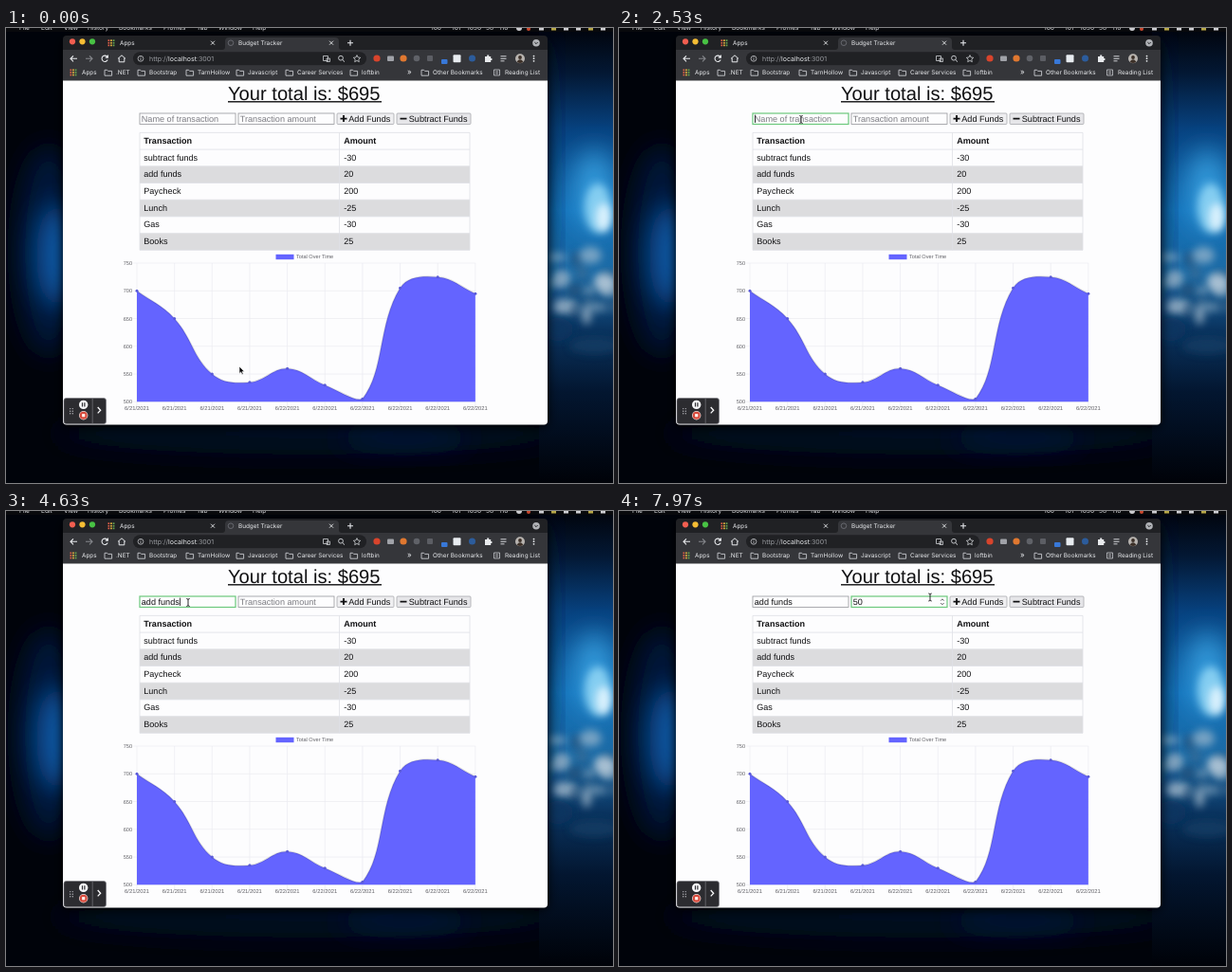
Recreate the animation shown at these times as an HTML page. Size 640x480 px, loop 8 s.

```html
<!DOCTYPE html>
<html lang="en">
<head>
<meta charset="utf-8">
<title>Budget Tracker</title>
<style>
html, body { margin: 0; width: 100%; height: 100%; overflow: hidden; background: #000; }
svg { display: block; width: 100%; height: 100%; }
text { font-family: "Liberation Sans", Arial, sans-serif; white-space: pre; text-rendering: geometricPrecision; }
.ui { font-family: Inter, Roboto, sans-serif; }
</style>
</head>
<body>
<svg id="stage" viewBox="0 0 640 480">
  <defs>
    <filter id="soft" x="-100%" y="-100%" width="300%" height="300%"><feGaussianBlur stdDeviation="14"/></filter>
    <filter id="mist" x="-100%" y="-100%" width="300%" height="300%"><feGaussianBlur stdDeviation="4"/></filter>
    <filter id="shade" x="-20%" y="-20%" width="140%" height="140%"><feGaussianBlur stdDeviation="6"/></filter>
    <linearGradient id="air" x2="0" y2="1">
      <stop offset="0" stop-color="#01040c"/>
      <stop offset=".1" stop-color="#031834"/>
      <stop offset=".22" stop-color="#07417e"/>
      <stop offset=".4" stop-color="#1270b8"/>
      <stop offset=".54" stop-color="#1c6aa4"/>
      <stop offset=".66" stop-color="#0a3460"/>
      <stop offset=".8" stop-color="#031630"/>
      <stop offset="1" stop-color="#000208"/>
    </linearGradient>
  </defs>
  <rect width="640" height="480" fill="#00030a"/>
  <g id="sky"></g>
  <g id="menu"></g>
  <g id="browser"></g>
  <g id="page"></g>
  <g id="chart"></g>
  <g id="widget"></g>
  <g id="live"></g>
</svg>
<script>
const NS = "http://www.w3.org/2000/svg";
const LOOP = 8000;
const INK = "#101012", PAPER = "#fdfdfe", LIGHT = "#e8eaed", GRAY = "#9a9ca1", BAR = "#202124", TOOLS = "#35363a";
const PLOT = "#6464ff", RULE = "#dfe0e6";
const byId = id => document.getElementById(id);
let layer;

function add(tag, attrs, content) {
  const el = document.createElementNS(NS, tag);
  for (const key in attrs) el.setAttribute(key, attrs[key]);
  if (content !== undefined) el.textContent = content;
  layer.appendChild(el);
  return el;
}
const rect = (x, y, width, height, fill, more) => add("rect", { x, y, width, height, fill, ...more });
const dot = (cx, cy, r, fill, more) => add("circle", { cx, cy, r, fill, ...more });
const shape = (d, fill) => add("path", { d, fill });
const line = (d, stroke, width = 1, more) =>
  add("path", { d, stroke, "stroke-width": width, fill: "none", ...more });
const label = (x, y, size, str, fill = INK, more) =>
  add("text", { x, y, "font-size": size, fill, ...more }, str);
const ui = (x, y, str, fill = LIGHT, size = 6.4) => label(x, y, size, str, fill, { class: "ui" });
const glow = (cx, cy, rx, ry, fill, filter = "soft", opacity = 1) =>
  add("ellipse", { cx, cy, rx, ry, fill, opacity, filter: `url(#${filter})` });

function drawSky() {
  layer = byId("sky");
  glow(45, 235, 34, 110, "#03183a");
  glow(54, 240, 22, 54, "#0a58a4");
  glow(320, 428, 270, 22, "#020b20");
  glow(420, 432, 70, 10, "#04183c");
  rect(562, 0, 78, 480, "url(#air)");
  glow(566, 150, 8, 150, "#041a3a", "soft", .8);
  glow(620, 170, 20, 42, "#3aa4e4", "soft", .9);
  glow(624, 190, 14, 26, "#9adcf8", "mist", .8);
  glow(630, 200, 8, 15, "#e4f6ff", "mist", .9);
  let seed = 11;
  const rand = () => (seed = seed * 16807 % 2147483647) / 2147483647;
  const tones = ["#8aa8c0", "#c2d2de", "#3f6c92", "#a8bfd0", "#294f74"];
  for (let i = 0; i < 22; i++) {
    glow(578 + rand() * 62, 238 + rand() * 70, 4 + rand() * 8, 3 + rand() * 7, tones[i % 5], "mist", .65);
  }
  glow(582, 318, 16, 12, "#0b3560", "mist", .8);
  glow(620, 335, 26, 9, "#123f68", "mist", .7);
}

function drawMenu() {
  layer = byId("menu");
  rect(0, 0, 640, 4, "#08090c");
  const items = [[14, "File"], [37, "Edit"], [61, "View"], [86, "History"], [119, "Bookmarks"],
    [166, "Profiles"], [201, "Tab"], [224, "Window"], [260, "Help"], [448, "100"], [470, "101"],
    [486, "1030"], [506, "58"], [520, "110"]];
  for (const [x, str] of items) ui(x, 1.6, str, "#dcdde0", 6.6);
  dot(541, 0, 3, "#d0d0d4");
  dot(551, 1, 2, "#d04a30");
  for (let i = 0; i < 6; i++) rect(562 + i * 13, 0, 5, 2.5, i % 3 == 1 ? "#b8a848" : "#d0d0d4");
}

function folder(x) {
  line(`M${x} 44.3h2.6l1 1.1h4v4.8h-7.6z`, "#c8cace", .9);
}

function apps(x, y) {
  const colors = ["#e06048", "#e4b040", "#68a850"];
  for (let i = 0; i < 9; i++) rect(x + i % 3 * 2.6, y + (i / 3 | 0) * 2.6, 1.7, 1.7, colors[i % 3]);
}

function drawBrowser() {
  layer = byId("browser");
  rect(60, 12, 511, 408, "#000", { rx: 5, filter: "url(#shade)" });
  rect(60, 8, 511, 410.5, BAR, { rx: 4 });
  rect(60, 23, 511, 33, TOOLS);
  shape("M228 23q3 0 3-3v-6q0-4 4-4h112q4 0 4 4v6q0 3 3 3z", TOOLS);
  ["#f25e50", "#f5bd34", "#48c244"].forEach((c, i) => dot(70 + i * 10.5, 14.3, 3.1, c));
  apps(107.5, 12.3);
  ui(120, 18.2, "Apps");
  dot(237, 15.7, 2.8, "none", { stroke: "#6c6e74", "stroke-width": .9 });
  ui(245, 18.2, "Budget Tracker");
  for (const x of [218, 343]) line(`M${x - 2} 13.7l4 4m0-4l-4 4`, LIGHT, .9);
  line("M360 15.7h6m-3-3v6", LIGHT, 1.1);
  dot(559, 15.7, 3.8, "#b0b2b6");
  line("M557.3 15l1.7 1.7 1.7-1.7", BAR, 1);

  line("M75 32.3h-7m3-3l-3 3 3 3", LIGHT, 1.1);
  line("M84 32.3h7m-3-3l3 3-3 3", "#85878c", 1.1);
  line("M107 30.6a3.2 3.2 0 1 0 .2 3M107.4 28.5v2.6h-2.6", LIGHT, 1.1);
  line("M118 32.4l4-3.6 4 3.6m-6.8-.8v4.2h5.6v-4.2", LIGHT, 1);
  rect(134, 25.3, 246, 14, BAR, { rx: 7 });
  dot(142, 32.3, 2.9, "none", { stroke: "#c4c6ca", "stroke-width": .8 });
  line("M142 31.7v2.2m0-3.6v.8", "#c4c6ca", .8);
  layer = ui(151, 34.7, "", GRAY, 7);
  add("tspan", {}, "http://");
  add("tspan", { fill: LIGHT }, "localhost");
  add("tspan", {}, ":3001");
  layer = byId("browser");
  line("M334.5 29.5h5v5h-5zM338 32h3.5v3.5h-3.5z", "#d0d2d6", .8);
  dot(353, 31.7, 2.4, "none", { stroke: "#d0d2d6", "stroke-width": .9 });
  line("M354.8 33.5l2.2 2.2", "#d0d2d6", 1);
  line("M370 28.6l1.1 2.4 2.6.3-1.9 1.8.5 2.6-2.3-1.3-2.3 1.3.5-2.6-1.9-1.8 2.6-.3z", "#d0d2d6", .8);

  dot(391, 32, 3.6, "#d8442c");
  rect(402, 29.5, 7, 5.5, "#a0a2a8", { rx: 1 });
  dot(419, 32, 3.6, "#e07830");
  dot(433, 32, 3.3, "#606268");
  rect(444, 29, 6, 6, "#5c5e64", { rx: 1 });
  rect(459, 33, 6.5, 5, "#3878d8", { rx: 1 });
  rect(471.5, 28.3, 8, 8, "#e8ecf0", { rx: 1 });
  dot(491.5, 32, 3.5, "#2c5c9c");
  shape("M505 30h2.2v-1.4h2V30h2v2h1.2v2h-1.2v2H505z", LIGHT);
  line("M521.5 29.8h6m-6 2.5h6m-6 2.5h4", "#d0d2d6", 1);
  dot(542, 32.2, 5, "#b8b4b0");
  dot(542, 31, 1.9, "#3c3028");
  shape("M538.6 35.6q3.4-4.5 6.8 0q-3.4 3-6.8 0z", "#3c3028");
  for (let i = 0; i < 3; i++) dot(556.5, 29.6 + i * 2.6, .9, LIGHT);

  apps(67.5, 43.5);
  const marks = [[104, ".NET"], [139, "Bootstrap"], [190, "TarnHollow"], [243, "Javascript"],
    [295, "Career Services"], [363, "loftbin"], [438, "Other Bookmarks"]];
  ui(80, 49.3, "Apps");
  for (const [x, str] of marks) { folder(x); ui(x + 12, 49.3, str); }
  ui(423, 49.2, "»", LIGHT, 8);
  line("M514.5 44h6v6h-6zM516 46h3m-3 2h3", "#c8cace", .8);
  ui(526, 49.3, "Reading List");
}

function drawPage() {
  layer = byId("page");
  shape("M60 55.5h511v359q0 4-4 4h-503q-4 0-4-4z", PAPER);
  label(234, 75.6, 20.15, "Your total is: $695");
  rect(234, 77.1, 162, 1.4, INK);
  const edge = { stroke: "#a8a9ae", "stroke-width": .8, rx: 1 };
  rect(349, 90, 60, 11.5, "#efeff1", edge);
  rect(412, 90, 78, 11.5, "#e6e6e9", edge);
  line("M352.5 95.6h7m-3.5-3.5v7M415.5 95.6h7", INK, 1.9);
  label(361.3, 98.7, 9.1, "Add Funds");
  label(424.8, 98.7, 9.1, "Subtract Funds");

  const rows = [["Transaction", "Amount"], ["subtract funds", -30], ["add funds", 20], ["Paycheck", 200],
    ["Lunch", -25], ["Gas", -30], ["Books", 25]];
  const top = 110.4, step = 17.7;
  rows.forEach((row, i) => {
    const y = top + i * step;
    if (i && i % 2 == 0) rect(141, y, 348, step, "#dcdcde");
    const bold = { "font-weight": i ? 400 : 700 };
    label(145.3, y + 11.5, 9.05, row[0], INK, bold);
    label(356.2, y + 11.5, 9.05, row[1], INK, bold);
  });
  for (let i = 0; i <= 7; i++) line(`M141 ${top + i * step}h348`, RULE, .8);
  line("M141 110.4v123.9M351.5 110.4v123.9M489 110.4v123.9", RULE, .8);
}

function drawChart() {
  layer = byId("chart");
  const left = 138, top = 248, bottom = 394.3, gap = 39.65;
  const toY = v => bottom - (v - 500) / 250 * (bottom - top);
  const pts = [700, 650, 550, 535, 560, 530, 505, 705, 725, 695].map((v, i) => [left + i * gap, toY(v)]);
  const right = pts[9][0];
  const grid = "#ebebf1", small = "#606066";

  rect(284.5, 238.8, 19, 5.4, PLOT);
  label(306, 243.3, 5.6, "Total Over Time", small);
  for (let v = 500; v <= 750; v += 50) {
    line(`M133.5 ${toY(v)}H${right}`, grid, .7);
    label(133, toY(v) + 2, 5.6, v, small, { "text-anchor": "end" });
  }
  pts.forEach(([x], i) => {
    line(`M${x} ${top}V398.5`, grid, .7);
    label(x, 403.2, 5.8, i < 4 ? "6/21/2021" : "6/22/2021", small, { "text-anchor": "middle" });
  });

  // Tension spline with handles kept inside the plot.
  const clampY = y => Math.max(top, Math.min(bottom, y));
  const dist = (a, b) => Math.hypot(a[0] - b[0], a[1] - b[1]);
  const handles = pts.map((p, i) => {
    const a = pts[i - 1] || p, b = pts[i + 1] || p;
    const da = dist(a, p), db = dist(p, b), k = .4 / (da + db);
    const at = s => [p[0] + s * (b[0] - a[0]), clampY(p[1] + s * (b[1] - a[1]))];
    return [at(-k * da), at(k * db)];
  });
  let d = `M${pts[0]}`;
  for (let i = 1; i < 10; i++) d += `C${handles[i - 1][1]} ${handles[i][0]} ${pts[i]}`;
  shape(`${d}V${bottom}H${left}z`, PLOT);
  line(d, "#000", 1.7, { opacity: .12 });
  for (const [x, y] of pts) dot(x, y, 1.5, "#5a5ad8");
}

function drawWidget() {
  layer = byId("widget");
  rect(61, 390.5, 44.5, 27, "#2c2c30", { stroke: "#78787e", "stroke-width": .7, rx: 2.5 });
  for (let i = 0; i < 6; i++) dot(67.7 + i % 2 * 2.6, 401.6 + (i / 2 | 0) * 2.6, .7, "#b4b4ba");
  dot(81.7, 397.4, 4.7, "#f8f8fa");
  line("M80.5 395.3v4.2m2.4-4.2v4.2", "#2c2c30", 1.2);
  dot(81.7, 408.7, 4.7, "#e8dcda");
  dot(81.7, 408.7, 4, "#d84a3c");
  rect(80.1, 407.1, 3.2, 3.2, "#fff0ec");
  line("M91.2 391v26", "#707076", .8);
  line("M96.7 400l3 3.2-3 3.2", "#f8f8fa", 1.3);
}

function makeField(x, hint, keys, focusAt, blurAt) {
  const box = rect(x, 90, 101, 11.5, PAPER);
  const text = label(x + 1.8, 98.7, 9.1, "");
  const caret = rect(0, 91.6, .8, 8.4, INK);
  return t => {
    const typed = keys.filter(k => k[0] <= t);
    const value = typed.map(k => k[1]).join("");
    const focused = t >= focusAt && t < blurAt;
    const last = typed.length ? typed[typed.length - 1][0] : focusAt;
    box.setAttribute("stroke", focused ? "#6cc87c" : "#96979c");
    box.setAttribute("stroke-width", focused ? 1.2 : .8);
    text.textContent = value || hint;
    text.setAttribute("fill", value ? INK : "#7c7c82");
    caret.setAttribute("x", x + 2.2 + (value ? text.getComputedTextLength() : 0));
    caret.setAttribute("opacity", focused && (t - last) % 1000 < 500 ? 1 : 0);
  };
}

const moves = [[0, 246, 357], [350, 246, 357], [900, 245.5, 348], [1250, 245.5, 348], [2150, 192, 96.5],
  [5000, 192, 96.5], [5800, 289, 96], [7450, 289, 96], [7970, 328, 91], [LOOP, 328, 91]];

function pointer(t) {
  const i = moves.findIndex(m => m[0] > t);
  const [t0, x0, y0] = moves[i - 1], [t1, x1, y1] = moves[i];
  const u = (t - t0) / (t1 - t0), e = u * u * (3 - 2 * u);
  return [x0 + (x1 - x0) * e, y0 + (y1 - y0) * e];
}

drawSky();
drawMenu();
drawBrowser();
drawPage();
drawChart();
drawWidget();

layer = byId("live");
const nameKeys = [..."add funds"].map((c, i) => [3450 + i * 130, c]);
const amountKeys = [[6900, "5"], [7180, "0"]];
const fields = [
  makeField(141, "Name of transaction", nameKeys, 2300, 6000),
  makeField(245, "Transaction amount", amountKeys, 6000, LOOP)
];
const spinner = line("M339.2 94.6l1.7-1.8 1.7 1.8m-3.4 2.4l1.7 1.8 1.7-1.8", "#505054", .9);
const arrow = add("path", { d: "M0 0v7.4l1.7-1.5 1.2 2.6 1.3-.6-1.2-2.5h2.3z",
  fill: "#08080a", stroke: PAPER, "stroke-width": .6 });
const beam = line("M-1.7-4q1.7 0 1.7 1.2v5.6q0 1.2-1.7 1.2M1.7-4q-1.7 0-1.7 1.2m0 5.6q0 1.2 1.7 1.2", INK, .9);

function render(t) {
  fields.forEach(f => f(t));
  const [x, y] = pointer(t);
  const inRow = y > 89 && y < 102;
  const overAmount = inRow && x > 245 && x < 346;
  const overInput = overAmount || inRow && x > 141 && x < 242;
  spinner.setAttribute("opacity", overAmount || t >= 6000 ? 1 : 0);
  for (const el of [arrow, beam]) el.setAttribute("transform", `translate(${x} ${y})`);
  arrow.setAttribute("opacity", overInput ? 0 : 1);
  beam.setAttribute("opacity", overInput ? 1 : 0);
}

const start = performance.now();
function tick() {
  render((performance.now() - start) % LOOP);
  requestAnimationFrame(tick);
}
tick();
</script>
</body>
</html>
```
